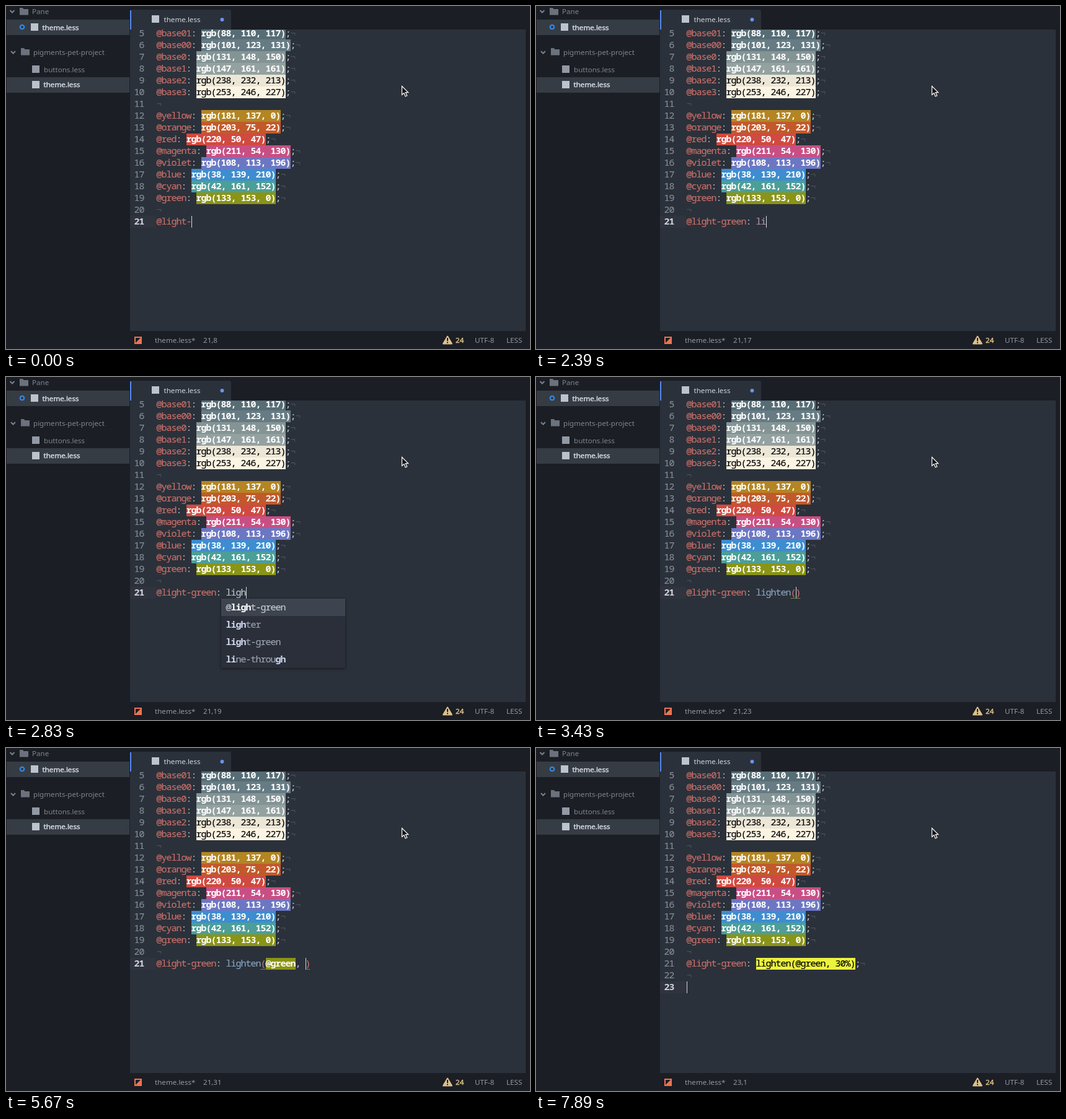
An HTML page that plays this animation: 845 by 554 pixels, repeating every 8000 ms.

```html
<!DOCTYPE html>
<html lang="en">
<head>
<meta charset="utf-8">
<title>Theme editor</title>
<style>
  html, body { margin: 0; width: 100%; height: 100%; overflow: hidden; background: #1b1e24; }
  svg { display: block; }
  text { white-space: pre; stroke-width: 0; }
  .code { font: 15px "Noto Sans Mono", monospace; letter-spacing: -1px; stroke-width: .15px; }
  .ui { font: 11.6px "Noto Sans", sans-serif; }
  .bold { font-weight: 700; stroke-width: 0; }
  .semi { stroke-width: .45px; }
</style>
</head>
<body>
<svg width="845" height="554" viewBox="0 0 845 554">
  <g id="still"></g>
  <g id="live"></g>
  <path d="M638.5 129.5v14l3.3-3 2.3 5.5 2.6-1.2-2.4-5.2h4.3z" fill="#111" stroke="#fff" stroke-width="1.2"/>
</svg>
<script>
const DARK = '#1b1e24', EDITOR = '#2b313a', GREY = '#bdc3cd', MUTED = '#9299a5',
      RED = '#c96f6a', BLUE = '#86a3c0', OLIVE = '#8a9416', FAINT = '#4a505b';
const LOOP = 8000, CELL = 8, LEFT = 243;

const rect = (x, y, w, h, fill, extra = '') =>
  `<rect x="${x}" y="${y}" width="${w}" height="${h}" fill="${fill}" ${extra}/>`;
const dot = (x, y, r, fill) => `<circle cx="${x}" cy="${y}" r="${r}" fill="${fill}"/>`;
const path = (d, extra) => `<path d="${d}" ${extra}/>`;
const text = (x, y, s, fill, cls) =>
  `<text x="${x}" y="${y}" fill="${fill}" stroke="${fill}" class="${cls}">${s}</text>`;
const code = (x, y, s, fill, bold) => text(x, y, s, fill, bold ? 'code bold' : 'code');
const ui = (x, y, s, fill = MUTED, cls = '') => text(x, y, s, fill, 'ui ' + cls);
const rowTop = n => 339 + 19 * (n - 21);

// Runs are [string, colour, background, bold], laid out on the character grid.
function codeRow(n, runs) {
  let x = LEFT, out = '';
  for (const [s, fill, back, bold] of runs) {
    if (back) out += rect(x, rowTop(n), s.length * CELL, 19, back);
    out += code(x - .5, rowTop(n) + 14, s, fill, bold);
    x += s.length * CELL;
  }
  return out;
}

function lineNumber(n, active) {
  const x = 223 - String(n).length * CELL;
  return (active ? rect(200, rowTop(n), 42, 19, '#30343f') : '') +
    code(x - .5, rowTop(n) + 14, n, active ? '#d0d4dc' : '#858c97', active);
}

function drawStill() {
  const colours = [
    [5, 'base01', '88, 110, 117', '#576d75'], [6, 'base00', '101, 123, 131', '#667b83'],
    [7, 'base0', '131, 148, 150', '#849495'], [8, 'base1', '147, 161, 161', '#94a1a1'],
    [9, 'base2', '238, 232, 213', '#ece6d6'], [10, 'base3', '253, 246, 227', '#fcf4e3'],
    [12, 'yellow', '181, 137, 0', '#b38523'], [13, 'orange', '203, 75, 22', '#c2592b'],
    [14, 'red', '220, 50, 47', '#d04a40'], [15, 'magenta', '211, 54, 130', '#c84f84'],
    [16, 'violet', '108, 113, 196', '#6c77c3'], [17, 'blue', '38, 139, 210', '#3d8dd0'],
    [18, 'cyan', '42, 161, 152', '#4c9e97'], [19, 'green', '133, 153, 0', OLIVE]];
  let out = rect(200, 38, 638, 487, EDITOR);
  for (const [n, name, rgb, back] of colours) {
    const light = n === 9 || n === 10;
    out += lineNumber(n) + codeRow(n, [['@' + name, RED], [': ', GREY],
      [`rgb(${rgb})`, light ? '#000' : '#fff', back, !light], [';', GREY], ['¬', FAINT]]);
  }
  for (const n of [11, 20]) out += lineNumber(n) + codeRow(n, [['¬', FAINT]]);

  out += rect(200, 0, 645, 38, DARK) + path('M200 38V9q0-3 3-3H360q3 0 3 3V38z', `fill="${EDITOR}"`) +
    rect(200, 7, 2, 31, '#568af2') + rect(235, 15, 12, 12, GREY) +
    ui(254.5, 26, 'theme.less', '#d3d7df') + dot(348.5, 22, 3, '#6a95ec');

  const folder = (x, y) => path(`M${x} ${y}h5l1.5 2H${x + 14}v9.5H${x}z`, 'fill="#6c727d"');
  const chevron = (x, y) => path(`M${x} ${y}l3.5 3.5 3.5-3.5`, 'fill="none" stroke="#7b818c" stroke-width="2"');
  out += rect(1, 22, 198, 25, '#363c44') + rect(1, 115, 198, 25, '#363c44') +
    chevron(6.5, 7) + folder(22, 3) + ui(42, 13, 'Pane', '#7f858f') +
    '<circle cx="26" cy="34" r="3.3" fill="none" stroke="#2f8df0" stroke-width="2"/>' +
    rect(40, 28, 12, 12, GREY) + ui(58.5, 39, 'theme.less', '#d9dde5', 'semi') +
    chevron(8, 73) + folder(24, 68) + ui(44, 79, 'pigments-pet-project', '#7f858f') +
    rect(42, 96, 12, 12, MUTED) + ui(61, 107, 'buttons.less', '#7f858f') +
    rect(42, 121, 12, 12, GREY) + ui(60.5, 131, 'theme.less', '#d9dde5', 'semi');

  out += rect(207, 534, 12, 12, '#ee7350') + path('M209 544V536H217z', `fill="${DARK}"`) +
    ui(240, 544, 'theme.less*') +
    path('M712 533.5L719 545.5H705z', 'fill="#dcc08e" stroke="#dcc08e" stroke-width="2" stroke-linejoin="round"') +
    rect(711, 536, 2, 5, DARK) + rect(711, 542.5, 2, 2, DARK) +
    ui(725, 544, '24', '#dcc08e', 'semi') + ui(756, 544, 'UTF-8') + ui(807, 544, 'LESS');
  return out;
}

// Each suggestion is [word, detail, swatch].
const lightWords = ['@light-green', 'lighter', 'light-green', 'line-through'].map(w => [w]);
const greenWords = [['@green', '', OLIVE], ['@button-background', '', '#0f3239'],
  ['@light-green', 'lighten(@)'], ['green'], ['groove']];
const lightMenu = (query, ...rows) => ({ query, x: 347, width: 200, words: rows.map(i => lightWords[i]) });
const greenMenu = query => ({ query, x: 419, width: 204, words: greenWords });

function drawMenu({ query, x, width, words }) {
  const top = 358, height = words.length * 28;
  let out = rect(x, top, width, height, '#2a2f39', 'style="filter:drop-shadow(0 1px 2px #0008)"') +
    rect(x, top, width, 28, '#3e444f');
  words.forEach(([word, detail, swatch], i) => {
    const y = top + 28 * i + 19;
    const wanted = [...query].filter(c => word.includes(c));
    [...word].forEach((c, k) => {
      const hit = c === wanted[0];
      if (hit) wanted.shift();
      const fill = i ? (hit ? '#cdd5ec' : '#9ba2af') : (hit ? '#fff' : '#c6cbd4');
      out += code(x + 7.5 + k * CELL, y, c, fill, hit);
    });
    if (detail) out += code(x + 17.5 + word.length * CELL, y, detail, '#6d7480');
    if (swatch) out += dot(x + 187, y - 7, 7, swatch);
  });
  return out;
}

const NAME = '@light-green', CALL = NAME + ': lighten(', FULL = CALL + '@green, 30%)';
const WHITE = '#fff', LIME = '#ecf23e';
// Each step is [start, text before the caret, options].
const steps = [
  [0, '@light-'], [150, '@light-g'], [300, '@light-gr'], [450, '@light-gre'], [600, NAME],
  [890, NAME + ':'], [1040, NAME + ': '], [1640, NAME + ': ', { blink: true }], [1940, NAME + ': '],
  [2390, NAME + ': li'],
  [2540, NAME + ': li', { menu: lightMenu('li', 0, 1, 2, 3) }],
  [2690, NAME + ': lig', { menu: lightMenu('lig', 0, 1, 2, 3) }],
  [2830, NAME + ': ligh', { menu: lightMenu('ligh', 0, 1, 2, 3) }],
  [2980, NAME + ': light', { menu: lightMenu('light', 0, 1, 2) }],
  [3130, NAME + ': lighte', { menu: lightMenu('lighte', 1, 0, 2) }],
  [3280, NAME + ': lighten', { menu: lightMenu('lighten', 0, 2) }],
  [3430, CALL], [3730, CALL + '@'], [4180, CALL + '@g'], [4330, CALL + '@gr'],
  [4480, CALL + '@gr', { menu: greenMenu('@gr') }],
  [4780, CALL + '@gr', { menu: greenMenu('@gr'), blink: true }],
  [4930, CALL + '@green'], [5380, CALL + '@green', { blink: true }],
  [5530, CALL + '@green,'], [5670, CALL + '@green, '], [5970, CALL + '@green, 3'],
  [6110, CALL + '@green, 3', { paint: WHITE }], [6410, CALL + '@green, 30', { paint: WHITE }],
  [6850, CALL + '@green, 30%', { paint: WHITE }], [7000, FULL, { paint: LIME }],
  [7450, FULL + ';', { paint: LIME }], [7590, FULL + ';\n', { paint: LIME }],
  [7890, FULL + ';\n\n', { paint: LIME }]
];

function valueRuns(value, paint) {
  if (paint) return [[value.replace(';', ''), '#000', paint], [value.endsWith(';') ? ';' : '', GREY]];
  const call = value.match(/^(lighten)(\()(@\w*)?(.*)\)$/);
  if (!call) return [[value, value === 'li' ? '#ad8eb3' : GREY]];
  const [, name, open, variable = '', rest] = call;
  const argument = variable === '@green' ? [variable, '#fff', OLIVE, true] : [variable, RED];
  return [[name, BLUE], [open, RED], argument, [rest, GREY], [')', RED]];
}

function drawLive([, typed, { menu, paint, blink } = {}]) {
  const lines = typed.split('\n'), last = lines.length - 1, column = lines[last].length;
  const caretRow = 21 + last;
  const closed = typed.includes('(') && !typed.includes(')') ? lines[0] + ')' : lines[0];
  const [, name, colon, value] = closed.match(/^(@[\w-]*)(:? ?)(.*)$/);
  let out = '';
  lines.forEach((line, i) => {
    const runs = i ? [] : [[name, RED], [colon, GREY], ...valueRuns(value, paint)];
    if (i < last) runs.push(['¬', FAINT]);
    out += lineNumber(21 + i, i === last) + codeRow(21 + i, runs);
  });
  if (closed.endsWith(')')) {
    for (const k of [closed.indexOf('('), closed.length - 1])
      out += path(`M${LEFT + k * CELL} 357.5h8`, 'stroke="#b4e03c" stroke-dasharray="1 1"');
  }
  if (!blink) out += rect(LEFT + column * CELL, rowTop(caretRow), 1, 19, '#d5d9e0');
  if (menu) out += drawMenu(menu);
  return out + ui(318, 544, `${caretRow},${column + 1}`);
}

const live = document.getElementById('live');
document.getElementById('still').innerHTML = drawStill();
let shown;
function tick() {
  const time = performance.now() % LOOP;
  const step = steps.findLast(([start]) => start <= time);
  if (step !== shown) live.innerHTML = drawLive(shown = step);
  requestAnimationFrame(tick);
}
tick();
</script>
</body>
</html>
```
